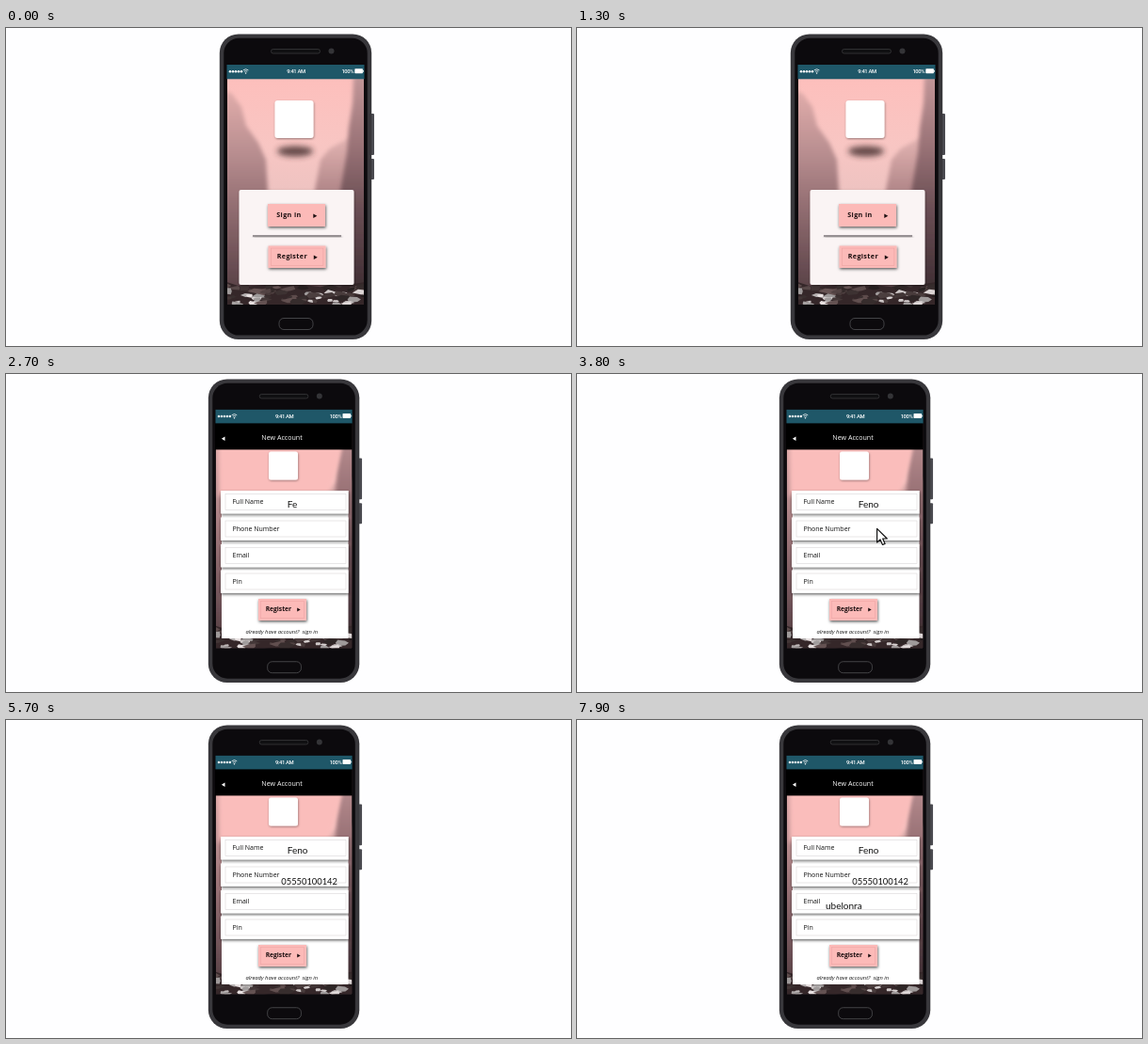
An HTML page for the animation above (8 s loop, 600 by 338 pixels).

```html
<!DOCTYPE html>
<html lang="en">
<head>
<meta charset="utf-8">
<title>Sign-up prototype</title>
<style>
  html, body { margin: 0; width: 100%; height: 100%; overflow: hidden; background: #fefeff; }
  svg { display: block; width: 600px; height: 338px; }
  text { font-family: "Open Sans", "Noto Sans", sans-serif; }
  .bar { font: 500 5.9px Roboto, sans-serif; letter-spacing: -.4px; fill: #fff; }
  .btn { font-weight: 700; fill: #1c0f10; }
  .wide { font-size: 7.2px; letter-spacing: .36px; }
  .label { font-size: 7px; fill: #111; }
  .typed { font: 10px Lato, "Open Sans", sans-serif; fill: #111; }
</style>
</head>
<body>
<svg viewBox="0 0 600 338" xmlns="http://www.w3.org/2000/svg">
  <defs>
    <linearGradient id="sky" x1="0" y1="0" x2="0" y2="1">
      <stop offset="0" stop-color="#fdbfbc"/>
      <stop offset=".3" stop-color="#f8c6c3"/>
      <stop offset=".48" stop-color="#efc3c1"/>
      <stop offset=".8" stop-color="#7d5c62"/>
      <stop offset="1" stop-color="#3a2b30"/>
    </linearGradient>
    <linearGradient id="leftCliff" x1="0" y1="0" x2="0" y2="1">
      <stop offset="0" stop-color="#e3aeac"/>
      <stop offset=".3" stop-color="#b78d8f"/>
      <stop offset=".5" stop-color="#987276"/>
      <stop offset="1" stop-color="#4a363c"/>
    </linearGradient>
    <linearGradient id="rightCliff" x1="0" y1="0" x2="0" y2="1">
      <stop offset="0" stop-color="#c39799"/>
      <stop offset=".3" stop-color="#9a7377"/>
      <stop offset=".55" stop-color="#6d5056"/>
      <stop offset="1" stop-color="#33252a"/>
    </linearGradient>
    <linearGradient id="haze" x1="0" y1="0" x2="0" y2="1">
      <stop offset="0" stop-color="#e8b8b6"/>
      <stop offset=".3" stop-color="#b58a8c"/>
      <stop offset="1" stop-color="#49353b"/>
    </linearGradient>
    <clipPath id="screen"><rect x="235" y="54" width="145" height="240"/></clipPath>
    <filter id="mist" x="-20%" y="-20%" width="140%" height="140%"><feGaussianBlur stdDeviation="2"/></filter>
    <filter id="blob" x="-50%" y="-100%" width="200%" height="300%"><feGaussianBlur stdDeviation="3"/></filter>
    <filter id="drop" x="-20%" y="-40%" width="140%" height="200%">
      <feDropShadow dx=".6" dy="1.4" stdDeviation="1.5" flood-color="#000" flood-opacity=".65"/>
    </filter>
    <filter id="soft" x="-20%" y="-20%" width="140%" height="150%">
      <feDropShadow dx=".5" dy="1" stdDeviation=".8" flood-color="#000" flood-opacity=".4"/>
    </filter>

    <g id="phone">
      <rect x="386" y="91" width="5" height="44" rx="1" fill="#4a4a50"/>
      <rect x="386" y="139" width="5" height="22" rx="1" fill="#4a4a50"/>
      <rect x="226.8" y="6.4" width="161.4" height="324.6" rx="20" fill="#38373b"/>
      <rect x="231.3" y="10.8" width="152.4" height="315.8" rx="16" fill="#0c0a0d"/>
      <rect x="281.5" y="22.5" width="52" height="4.5" rx="2.2" fill="#101012" stroke="#39393c" stroke-width=".8"/>
      <circle cx="345.5" cy="24.6" r="3" fill="#343437"/>
      <rect x="290" y="308.5" width="36" height="12" rx="5" fill="none" stroke="#4a4a4d" stroke-width=".9"/>
      <g clip-path="url(#screen)">
        <rect x="235" y="54" width="146" height="240" fill="url(#sky)"/>
        <path filter="url(#mist)" fill="url(#leftCliff)" d="M228 64 L240 70 250 84 255 104 268 122 276 140 278 172 290 300 228 300Z"/>
        <path filter="url(#mist)" fill="url(#haze)" d="M386 112 L362 118 344 128 334 140 328 172 318 300 386 300Z"/>
        <path filter="url(#mist)" fill="url(#rightCliff)" d="M386 50 L369 52 368 80 364 106 362 132 354 180 345 300 386 300Z"/>
        <path fill="#352729" d="M234 270 L250 275 300 271 340 276 381 270V295H234Z"/>
        <g id="rocks"></g>
      </g>
      <rect x="234.5" y="39" width="146" height="15.3" fill="#1f5768"/>
      <g fill="#fff">
        <g id="dots"></g>
        <circle cx="254.6" cy="48" r=".8"/>
        <path d="M252.9 46.4q1.7-1.5 3.4 0M251.8 44.9q2.8-2.3 5.6 0" fill="none" stroke="#fff" stroke-width=".8"/>
        <rect x="370.3" y="43.2" width="8.6" height="5" rx=".7"/>
        <rect x="379.2" y="44.7" width=".8" height="2" rx=".3"/>
      </g>
      <text class="bar" x="308" y="48.2" text-anchor="middle">9:41 AM</text>
      <text class="bar" x="369.2" y="48.2" text-anchor="end">100%</text>
    </g>
  </defs>

  <rect width="600" height="338" fill="#fefeff"/>

  <g id="welcome">
    <use href="#phone"/>
    <ellipse cx="307" cy="131" rx="19" ry="5.5" fill="#3b2526" opacity=".78" filter="url(#blob)"/>
    <rect x="285.5" y="77" width="41" height="40" rx="3" fill="#fff" filter="url(#soft)"/>
    <rect x="247.5" y="172" width="122" height="101" rx="2" fill="#faf4f4" filter="url(#soft)"/>
    <g filter="url(#drop)" fill="#fcbab8">
      <rect x="278" y="187" width="61" height="24"/>
      <rect x="278.5" y="231.5" width="61" height="23.5"/>
    </g>
    <rect x="281.3" y="234.1" width="55.6" height="18.2" fill="none" stroke="#eda3a2" stroke-width=".6"/>
    <text class="btn wide" x="287.3" y="201.1">Sign in</text>
    <text class="btn wide" x="287.7" y="245.2">Register</text>
    <path fill="#1c0f10" d="M326.3 197.5l4 2.3-4 2.3zM326.8 241.5l4 2.3-4 2.3z"/>
    <rect x="262" y="220.3" width="94" height="1.4" fill="#777174" filter="url(#soft)"/>
  </g>

  <g id="signup">
    <use href="#phone" transform="translate(-10.6 -.9) scale(.994)"/>
    <path fill="#fabdbb" filter="url(#mist)" d="M226 72H358L350 104 342 130H226Z"/>
    <rect x="222" y="52.4" width="145.7" height="28" fill="#000"/>
    <path fill="#fff" d="M232.5 66.5v4.6l-3.6-2.3z"/>
    <text x="293" y="70" font-size="7.1" fill="#fff" text-anchor="middle">New Account</text>
    <rect x="279" y="82.5" width="31" height="30" rx="2.5" fill="#fff" filter="url(#soft)"/>
    <rect x="229" y="124" width="134.5" height="157" fill="#fff"/>
    <g id="fields"></g>
    <rect x="268" y="239" width="51" height="23" fill="#fcbab8" filter="url(#drop)"/>
    <rect x="270.3" y="241.3" width="46.4" height="18.4" fill="none" stroke="#f0a6a5" stroke-width=".6"/>
    <text class="btn" x="275.7" y="252" font-size="6.7">Register</text>
    <path fill="#1c0f10" d="M309.2 248.6l3.5 2-3.5 2z"/>
    <text x="254.5" y="276" font-size="5.8" font-style="italic" fill="#111">already have account?&#160; sign in</text>
    <text class="typed" id="name" x="298.7" y="142"></text>
    <text class="typed" id="phoneNo" x="292.3" y="175" style="font-size:9.35px"></text>
    <text class="typed" id="email" x="264" y="201"></text>
  </g>

  <path id="cursor" d="M.6 .4V15l3.4-3 2.5 5.5 2.6-1.1-2.4-5.4h4.6z" fill="#fff" stroke="#111" stroke-width="1.2" stroke-linejoin="round"/>
</svg>

<script>
const LOOP = 8000, SWITCH = 1400;
const $ = id => document.getElementById(id);

function seeded(seed) {
  return () => (seed = seed * 16807 % 2147483647) / 2147483647;
}

// Brown rubble, with pale stones lying along the bottom on both sides
function drawRocks() {
  const rnd = seeded(41);
  let out = '';
  for (let i = 0; i < 75; i++) {
    const x = 232 + rnd() * 150, y = 274 + i / 75 * 20, r = 2 + rnd() * 4.5;
    const pts = [];
    for (let k = 0; k < 6; k++) {
      const a = k * Math.PI / 3, q = r * (.5 + rnd() * .8);
      pts.push((x + q * Math.cos(a) * 1.5).toFixed(1) + ',' + (y + q * Math.sin(a) * .6).toFixed(1));
    }
    const pale = y > 279 && (x < 272 || x > 318) && rnd() < .62;
    const g = pale ? 150 + rnd() * 85 : 35 + rnd() * 70;
    const warm = pale ? .97 : .82;
    out += `<polygon points="${pts.join(' ')}" fill="rgb(${g},${g * warm},${g * warm})"/>`;
  }
  $('rocks').innerHTML = out;
}

function drawDots() {
  $('dots').innerHTML = [0, 1, 2, 3, 4]
    .map(i => `<circle cx="${238 + i * 3}" cy="46.2" r="1.25"/>`).join('');
}

function drawFields() {
  const rows = [['Full Name', 124, 138], ['Phone Number', 152.5, 167], ['Email', 181, 195], ['Pin', 208.5, 222.5]];
  $('fields').innerHTML = rows.map(([label, y, base]) => `
    <rect x="228" y="${y}" width="135.5" height="24.3" fill="#fff" filter="url(#drop)"/>
    <rect x="233" y="${y + 3.5}" width="128" height="17" fill="none" stroke="#d9d6d8" stroke-width=".6"/>
    <text class="label" x="240.5" y="${base}">${label}</text>`).join('');
}

// Each entry: text and the time at which each character appears
const every = (start, n, step = 100) => Array.from({ length: n }, (_, i) => start + i * step);
const typing = [
  ['name', 'Feno', every(2600, 4)],
  ['phoneNo', '05550100142', [...every(4200, 4, 200), 4900, 5000, 5200, ...every(5400, 4)]],
  ['email', 'ubelonra', every(7200, 8)]
];

// Pointer trips: show time, hide time, start point, end point
const trips = [
  [100, 900, 388, 130, 322, 246],
  [3300, 4000, 381, 123, 318, 164],
  [6300, 7000, 375, 117, 312, 192]
];
const GLIDE = 455;

function render(t) {
  const form = t >= SWITCH;
  $('welcome').style.display = form ? 'none' : '';
  $('signup').style.display = form ? '' : 'none';

  for (const [id, text, times] of typing) {
    const shown = text.slice(0, times.filter(at => at <= t).length);
    if ($(id).textContent !== shown) $(id).textContent = shown;
  }

  const trip = trips.find(([from, to]) => t >= from && t < to);
  $('cursor').style.display = trip ? '' : 'none';
  if (trip) {
    const [from, , x0, y0, x1, y1] = trip;
    const p = 1 - (1 - Math.min(1, (t - from) / GLIDE)) ** 3;
    $('cursor').setAttribute('transform', `translate(${x0 + (x1 - x0) * p} ${y0 + (y1 - y0) * p})`);
  }
}

drawRocks();
drawDots();
drawFields();

const start = performance.now();
function tick() {
  render((performance.now() - start) % LOOP);
  requestAnimationFrame(tick);
}
render(0);
requestAnimationFrame(tick);
</script>
</body>
</html>
```
